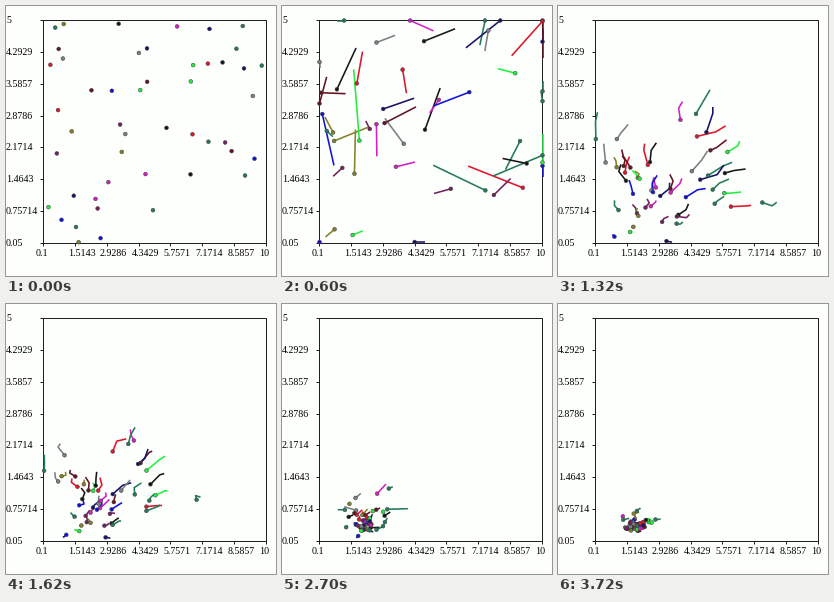
Recreate the animation shown at these times as a matplotlib script. Size 270 by 270 pixels, loop 3.78 s.

```python
import numpy as np
import matplotlib.pyplot as plt
from matplotlib.animation import FuncAnimation
from matplotlib.collections import LineCollection

SIZE, DPI = 270, 100
PX = 72 / DPI
FRAMES, STEP_MS = 63, 60
LEFT, TOP, RIGHT, BOTTOM = 37, 14, 260, 237

COUNT = 48
LEG = 5            # frames between two swarm updates
WANDER_LEGS = 2    # free roaming before the swarm contracts
TRAIL = 3          # trail length in frames
INKS = ["#85802c", "#d420c4", "#237a5c", "#641420", "#1212dc", "#7e7e82",
        "#22ee40", "#141468", "#e0142c", "#74205e", "#237a5c", "#161616"]


def inside(pos):
    return np.clip(pos, (LEFT + 0.5, TOP + 0.5), (RIGHT + 0.5, BOTTOM - 1))


def swarm_nodes():
    """Position of every particle at each swarm update."""
    rng = np.random.default_rng(11)
    pos = rng.uniform((LEFT, TOP), (RIGHT, BOTTOM), (COUNT, 2))
    keep = rng.uniform(0.58, 0.79, (COUNT, 1))
    legs = FRAMES // LEG + 1
    nodes = [pos]
    for leg in range(legs):
        noise = rng.normal(size=(COUNT, 2))
        if leg < WANDER_LEGS:
            pos = pos + 45 * noise
        else:
            goal = np.array([87 - 14 * leg / legs, 224])
            away = pos - goal
            dist = np.hypot(away[:, :1], away[:, 1:])
            pos = goal + keep * away + noise * ((4, 1.5) + 0.06 * dist)
        pos = inside(pos)
        nodes.append(pos)
    return nodes


def place(t):
    leg, step = divmod(t, LEG)
    return nodes[leg] + (nodes[leg + 1] - nodes[leg]) * step / LEG


nodes = swarm_nodes()
path = np.array([place(t) for t in range(FRAMES)])

fig = plt.figure(figsize=(SIZE / DPI, SIZE / DPI), dpi=DPI, facecolor="#fdfffc")
ax = fig.add_axes([0, 0, 1, 1])
ax.set_xlim(0, SIZE)
ax.set_ylim(SIZE, 0)
ax.axis("off")


def rule(xs, ys):
    ax.plot(xs, ys, color="#202020", lw=PX, solid_capstyle="butt", zorder=1)


def label(x, y, value):
    ax.text(x, y, f"{value:.5g}", family="Liberation Serif", size=10 * PX,
            color="black", ha="left", va="center_baseline")


rule([LEFT, RIGHT, RIGHT, LEFT, LEFT], [TOP, TOP, BOTTOM, BOTTOM, TOP])
for i in range(8):
    tx = LEFT + (RIGHT - LEFT) * i / 7
    ty = BOTTOM - (BOTTOM - TOP) * i / 7
    rule([tx, tx], [BOTTOM, BOTTOM + 3])
    rule([LEFT - 3, LEFT], [ty, ty])
    label(tx - 7, 246, 0.1 + 9.9 * i / 7)
    label(0, ty - 0.5, 0.05 + 4.95 * i / 7)

inks = [INKS[i % len(INKS)] for i in range(COUNT)]
trails = LineCollection([], colors=inks, linewidths=1.6 * PX, zorder=3)
ax.add_collection(trails)
dots = ax.scatter(*path[0].T, s=(3.8 * PX) ** 2, c=inks,
                  edgecolors="#404040", linewidths=0.5 * PX, zorder=4)


def draw(i):
    recent = path[max(i - TRAIL, 0):i + 1]
    trails.set_segments(list(recent.transpose(1, 0, 2)) if i else [])
    dots.set_offsets(path[i])
    return trails, dots


anim = FuncAnimation(fig, draw, frames=FRAMES, interval=STEP_MS,
                     repeat=True, repeat_delay=0)
plt.show()
```
